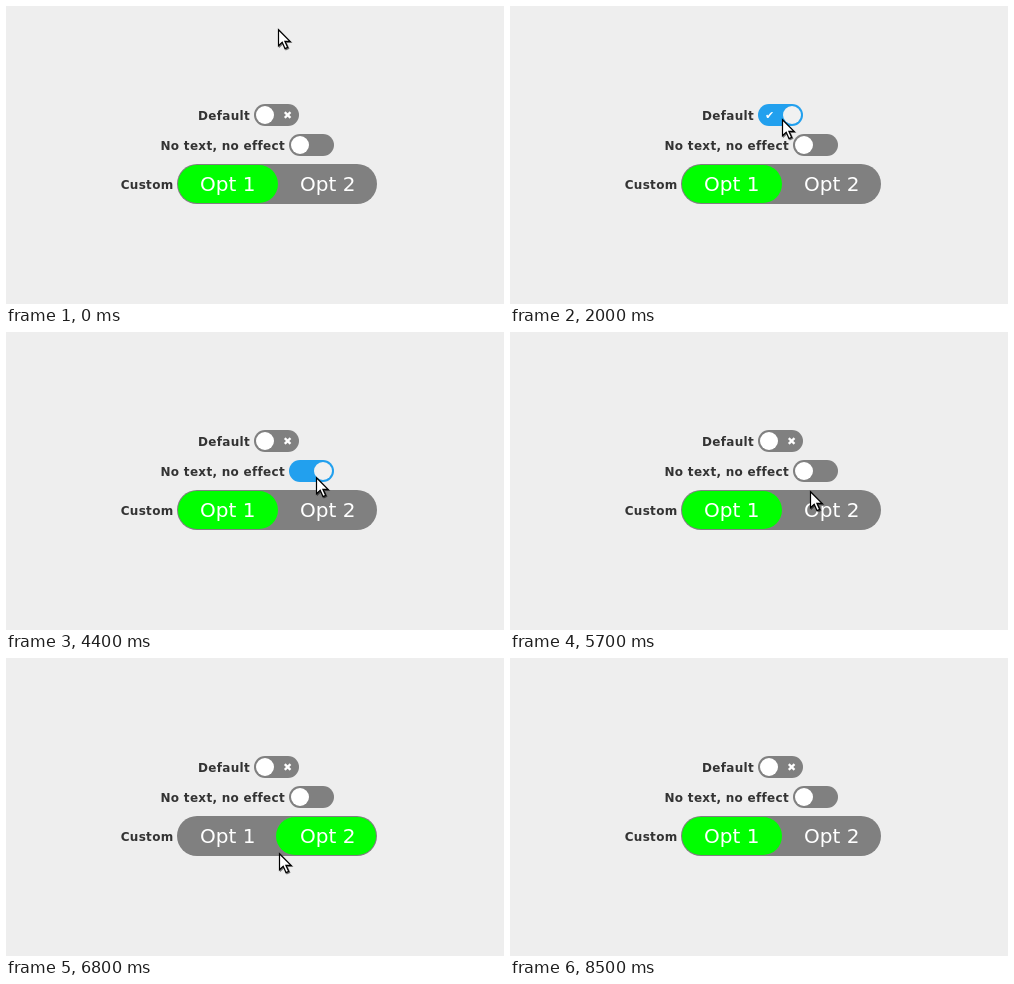
An HTML page for the animation above (9000 ms loop, 498 by 298 pixels).

```html
<!DOCTYPE html>
<html lang="en">
<head>
<meta charset="utf-8">
<title>Toggle switches</title>
<style>
  html, body { margin: 0; width: 100%; height: 100%; overflow: hidden; background: #eee; }
  svg { display: block; }
  text { font-family: "DejaVu Sans", sans-serif; fill: #fff; }
  .label { font-size: 12px; font-weight: bold; letter-spacing: .3px; fill: #333; text-anchor: end; }
  .mark { font-size: 11px; text-anchor: middle; }
  .option { font-size: 20px; text-anchor: middle; }
  #cursor { fill: #fff; stroke: #000; stroke-width: 1.2; filter: drop-shadow(1px 1px .5px #0008); }
</style>
</head>
<body>
<svg width="498" height="298" viewBox="0 0 498 298">
  <text class="label" x="244" y="114">Default</text>
  <rect id="track1" x="248" y="98" width="45" height="22" rx="11"/>
  <text class="mark" x="259.5" y="113">✔</text>
  <text class="mark" x="281.5" y="113">✖</text>
  <circle id="knob1" cy="109" r="9"/>

  <text class="label" x="279" y="144">No text, no effect</text>
  <rect id="track2" x="283" y="128" width="45" height="22" rx="11"/>
  <circle id="knob2" cy="139" r="9"/>

  <text class="label" x="167.5" y="183">Custom</text>
  <rect x="171" y="158" width="200" height="40" rx="20" fill="#808080"/>
  <rect id="pill" y="159" width="100" height="38" rx="19" fill="#0f0"/>
  <text class="option" x="221.7" y="185">Opt 1</text>
  <text class="option" x="321.7" y="185">Opt 2</text>

  <path id="cursor" d="M.5 .8V16.8L4.2 13.3L7 19.6L9.7 18.4L6.9 12.3H12Z"/>
</svg>
<script>
const LOOP = 9000, STEP = 100, SLIDE = 200;
const OFF = [128, 128, 128], ON = [34, 160, 238];

// Pointer strokes: each is a curve from the previous stop, pulled towards "via"
const home = [272, 23];
const strokes = [
  { start: 500, end: 1300, via: [250, 60], to: [272, 113] },
  { start: 2900, end: 3500, via: [301, 122], to: [310, 147] },
  { start: 3600, end: 4200, via: [310, 149], to: [310, 145] },
  { start: 5500, end: 6100, via: [291, 172], to: [273, 195] },
  { start: 7800, end: 8500, via: [30, 280], to: [68, -30] }
];

const $ = id => document.getElementById(id);
const clamp = v => Math.max(0, Math.min(1, v));
const lerp = (a, b, p) => a + (b - a) * p;
const ease = p => p * p * (3 - 2 * p);
const slide = (t, on, off) => clamp((t - on) / SLIDE) - clamp((t - off) / SLIDE);

function pointer(t) {
  let tip = home;
  for (const { start, end, via, to } of strokes) {
    const p = ease(clamp((t - start) / (end - start)));
    tip = tip.map((a, i) => lerp(lerp(a, via[i], p), lerp(via[i], to[i], p), p));
  }
  return tip.map(Math.round);
}

function drawSwitch(n, left, top, p, [px, py]) {
  const hover = px >= left && px < left + 45 && py + 3 >= top && py < top + 22;
  $("track" + n).setAttribute("fill", `rgb(${OFF.map((c, i) => Math.round(lerp(c, ON[i], p)))})`);
  $("knob" + n).setAttribute("cx", left + 11 + 23 * p);
  $("knob" + n).setAttribute("fill", hover ? "#f1f1f1" : "#fff");
}

function frame(now) {
  const t = Math.floor(now % LOOP / STEP) * STEP;
  const tip = pointer(t);
  drawSwitch(1, 248, 98, slide(t, 1775, 2624), tip);
  drawSwitch(2, 283, 128, t >= 4400 && t < 5200 ? 1 : 0, tip);
  $("pill").setAttribute("x", Math.round(172 + 98 * slide(t, 6575, 7524)));
  $("cursor").setAttribute("transform", `translate(${tip})`);
}

let start;
function tick(now) {
  start ??= now;
  frame(now - start);
  requestAnimationFrame(tick);
}
frame(0);
requestAnimationFrame(tick);
</script>
</body>
</html>
```
